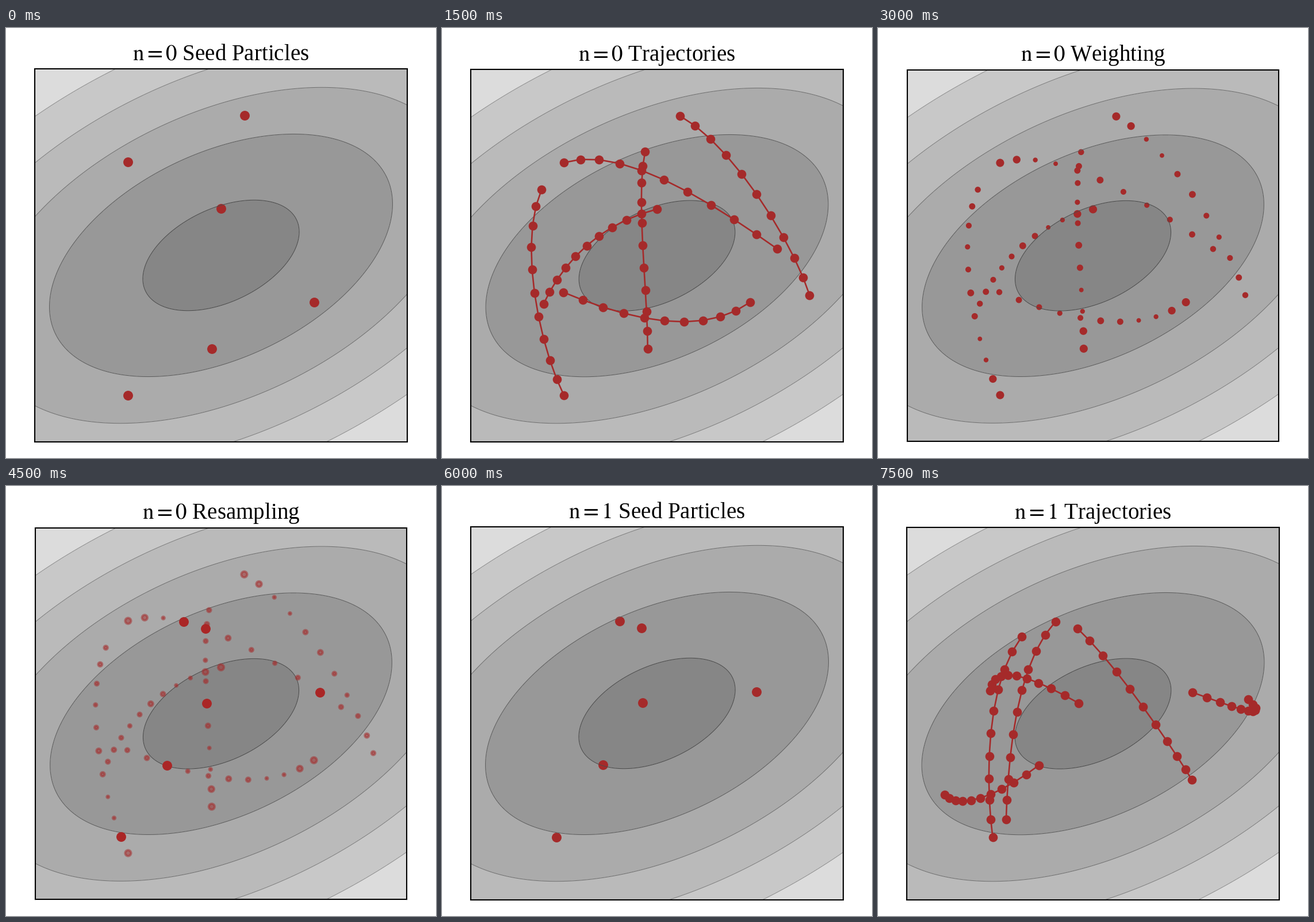
Recreate the animation shown at these times as a matplotlib script. Size 748 px wide and 748 px high, loop 8 s.

```python
import numpy as np
import matplotlib.pyplot as plt
from matplotlib.animation import FuncAnimation

SIZE, DPI = 748, 187
STEP_MS, HOLD = 500, 3          # each stage is held for three ticks
BROWN = "brown"

plt.rcParams["font.family"] = "Liberation Serif"
plt.rcParams["mathtext.fontset"] = "stix"

# Gaussian target: motion is harmonic in the eigenbasis of its precision matrix
precision = np.linalg.inv([[2.0, 0.6], [0.6, 1.0]])
lam, basis = np.linalg.eigh(precision)
omega = np.sqrt(lam)
SPEED = np.sqrt(5)
STEPS = 11
times = np.linspace(0, np.pi / 2, STEPS)[:, None]

grid = np.linspace(-4, 4, 321)
X, Y = np.meshgrid(grid, grid)
points = np.stack([X, Y], axis=-1)
energy = np.einsum("...i,ij,...j", points, precision, points)
LEVELS = [1.407, 6.77, 12.98, 20.3, 29.25]
greys = np.array([134, 152, 171, 186, 200, 220]) / 255
fills = [str(g) for g in greys]
edges = [str(g - 0.23) for g in greys[:-1]]


def trajectory(start, heading):
    """Exact Hamiltonian path from start, launched along heading (degrees)."""
    angle = np.radians(heading)
    q = start @ basis
    p = SPEED * np.array([np.cos(angle), np.sin(angle)]) @ basis
    return (q * np.cos(omega * times) + p / omega * np.sin(omega * times)) @ basis.T


def launch(seeds, headings):
    return np.array([trajectory(s, h) for s, h in zip(seeds, headings)])


seeds0 = np.array([(0.5, 3), (-2, 2), (0, 1), (2, -1), (-0.2, -2), (-2, -3)])
paths0 = launch(seeds0, [-28.3, 18, 194, 215.9, 90, 116.7])

# (path, step) of every resampled particle
picks = [(1, 3), (1, 4), (4, 5), (1, 9), (3, 8), (5, 1)]
seeds1 = np.array([paths0[pick] for pick in picks])
paths1 = launch(seeds1, [226.6, -43.1, 150.9, -19.4, 216.8, 97.6])

# dot radius in pixels is a damped wave along each path
k = np.arange(STEPS)
radii = 5.1 + 2.6 * np.exp(-k / 4.5) * np.cos(1.45 * (k - 0.5))
areas = np.tile((2 * radii * 72 / DPI - 1.5) ** 2, len(paths0))
cloud = paths0.reshape(-1, 2)

fig = plt.figure(figsize=(SIZE / DPI, SIZE / DPI), dpi=DPI, facecolor="white")


def dots(ax, xy, size=25, color=BROWN, **kw):
    ax.scatter(*xy.T, s=size, color=color, linewidths=1.5, **kw)


def lines(ax, paths):
    for path in paths:
        ax.plot(*path.T, "o-", color=BROWN, lw=1, ms=5)


def resampling(ax):
    dots(ax, cloud, areas, alpha=0.5, zorder=2)
    dots(ax, seeds1, color="#aa2626", zorder=3)


def make_stage(n, title, box, show):
    """Build one hidden square panel; box is (side, bottom) in pixels."""
    side, bottom = box
    ax = fig.add_axes([0.5 - side / SIZE / 2, 1 - bottom / SIZE,
                       side / SIZE, side / SIZE], label=f"{n} {title}")
    ax.contourf(X, Y, energy, levels=[-1] + LEVELS + [50], colors=fills)
    ax.contour(X, Y, energy, levels=LEVELS, colors=edges, linewidths=0.4)
    show(ax)
    ax.set(xlim=(-4, 4), ylim=(-4, 4), xticks=[], yticks=[], visible=False)
    ax.set_title(rf"$\mathrm{{n}} = {n}$ {title}", fontsize=15, pad=6, y=1.0)
    return ax


# the panel shrinks a little when its title has descenders
SEED_BOX, PATH_BOX, CLOUD_BOX = (648.8, 719.9), (647.6, 719.9), (646.4, 719.4)

stages = [
    make_stage(0, "Seed Particles", SEED_BOX, lambda ax: dots(ax, seeds0)),
    make_stage(0, "Trajectories", PATH_BOX, lambda ax: lines(ax, paths0)),
    make_stage(0, "Weighting", CLOUD_BOX, lambda ax: dots(ax, cloud, areas)),
    make_stage(0, "Resampling", CLOUD_BOX, resampling),
    make_stage(1, "Seed Particles", SEED_BOX, lambda ax: dots(ax, seeds1)),
    make_stage(1, "Trajectories", PATH_BOX, lambda ax: lines(ax, paths1)),
]


def draw(i):
    for s, ax in enumerate(stages):
        ax.set_visible(s == i // HOLD)
    return stages


anim = FuncAnimation(fig, draw, frames=16, init_func=lambda: draw(0),
                     interval=STEP_MS, repeat=True, repeat_delay=0, blit=False)
plt.show()
```
